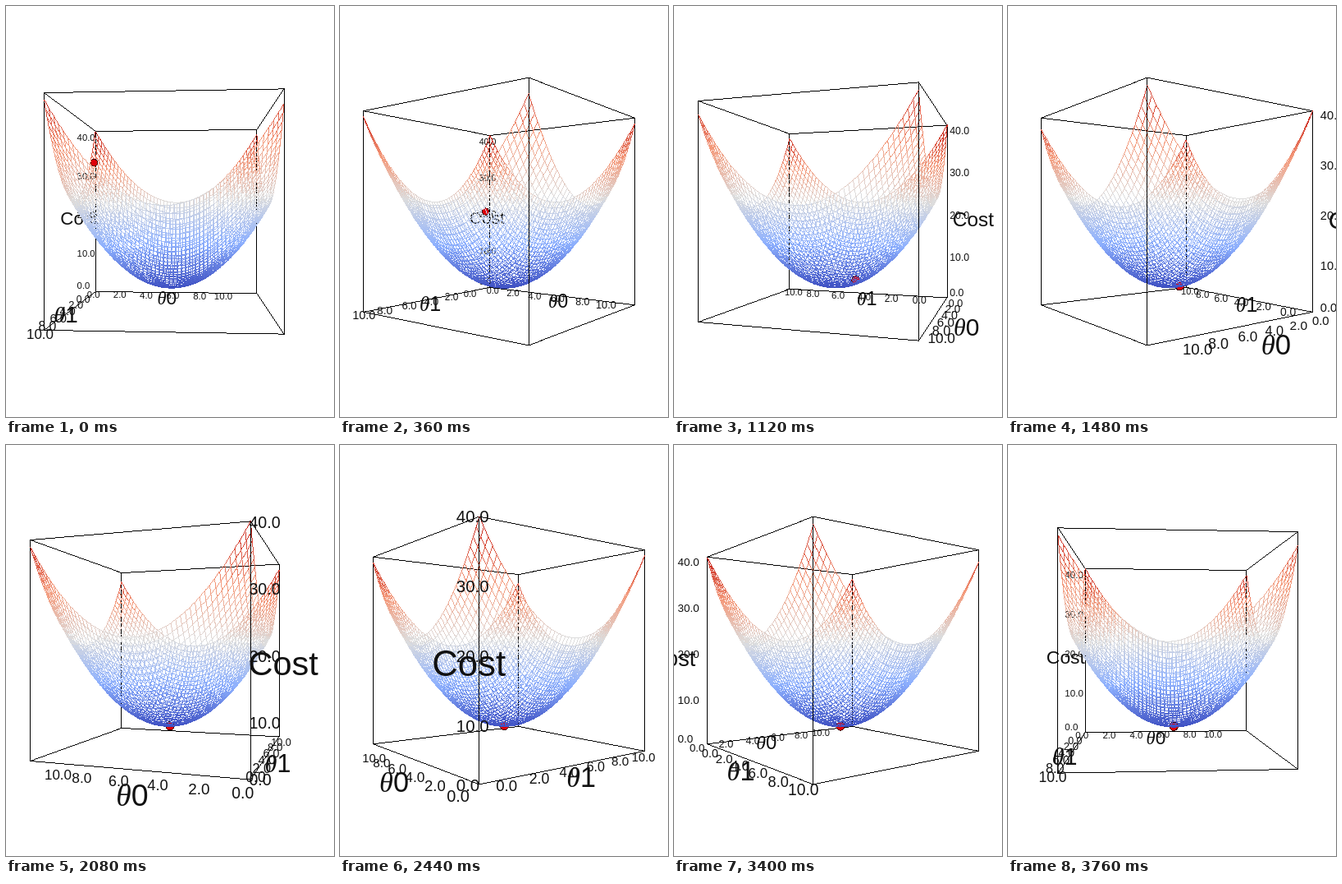
Animation, 400 px wide and 500 px high, one loop 3800 ms. Source, as an HTML page with a canvas:

```html
<!DOCTYPE html>
<html lang="en">
<head>
<meta charset="utf-8">
<title>Gradient descent on a cost surface</title>
<style>
  html, body { margin: 0; width: 100%; height: 100%; overflow: hidden; background: #fff; }
  canvas { display: block; width: 400px; height: 500px; }
</style>
</head>
<body>
<canvas id="stage" width="400" height="500"></canvas>
<script>
const W = 400, H = 500, STEP = 40, FRAMES = 95;
const FOCAL = 599, DIST = 2.54;
const ctx = document.getElementById('stage').getContext('2d', { willReadFrequently: true });
const depth = new Float32Array(W * H);
const SANS = '"Liberation Sans", Arial, sans-serif';
const SERIF = '"Liberation Serif", "Times New Roman", serif';

// Cost bowl inside a unit cube centred on the origin
const LOW = -0.39, CURVE = 1.72, MID = 0.0087, GRID = 50;
const cost = (u, v) => LOW + CURVE * ((u - MID) ** 2 + (v - MID) ** 2);

const STOPS = [[59, 76, 192], [141, 176, 254], [221, 221, 221], [244, 154, 123], [200, 36, 26]];
function heat(h) {
  const k = Math.min(3.999, Math.max(0, (h - LOW) / (0.5 - LOW) * 4));
  const i = Math.floor(k), f = k - i;
  return STOPS[i].map((c, j) => c + (STOPS[i + 1][j] - c) * f);
}

const mesh = [];
for (let i = 0; i < GRID; i++) {
  for (let j = 0; j < GRID; j++) {
    const u = i / (GRID - 1) - 0.5, v = j / (GRID - 1) - 0.5, h = cost(u, v);
    mesh.push({ u, v, h, rgb: heat(h) });
  }
}

// Labels: position, text and size in world units
const labels = [];
const tick = (u, v, h, n) => labels.push({ u, v, h, text: n.toFixed(1), size: 0.0595 });
for (let i = 0; i < 6; i++) {
  tick(i < 5 ? -0.505 + 0.1695 * i : 0.305, -0.57, -0.53, 2 * i);
  tick(-0.52, i < 5 ? -0.358 + 0.17 * i : 0.474, -0.523, 2 * i);
}
for (let i = 0; i < 5; i++) tick(-0.57, -0.57, i ? -0.515 + 0.2474 * i : -0.475, 10 * i);
const title = (u, v, h, text) => labels.push({ u, v, h, text, size: 0.12, title: true });
title(-0.062, -0.64, -0.56, 'θ0');
title(-0.548, -0.004, -0.54, 'θ1');
title(-0.638, -0.638, -0.043, 'Cost');

let cos = 1, sin = 0, pixels;

function project(u, v, h) {
  const z = DIST - (v * cos + u * sin), s = FOCAL / z;
  return { x: W / 2 + (u * cos - v * sin) * s, y: H / 2 - h * s, z, s };
}

function plot(x, y, z, rgb) {
  if (x < 0 || y < 0 || x >= W || y >= H) return;
  const i = Math.floor(y) * W + Math.floor(x);
  if (z >= depth[i]) return;
  depth[i] = z;
  pixels[4 * i] = rgb[0];
  pixels[4 * i + 1] = rgb[1];
  pixels[4 * i + 2] = rgb[2];
  pixels[4 * i + 3] = 255;
}

function line(a, b, rgb) {
  const dx = b.x - a.x, dy = b.y - a.y, dz = b.z - a.z;
  const n = Math.max(1, Math.ceil(Math.max(Math.abs(dx), Math.abs(dy))));
  for (let i = 0; i <= n; i++) {
    const t = i / n;
    plot(a.x + dx * t, a.y + dy * t, a.z + dz * t, rgb);
  }
}

function drawMesh() {
  const pts = mesh.map(p => project(p.u, p.v, p.h));
  for (let i = 0; i < GRID; i++) {
    for (let j = 0; j < GRID; j++) {
      const k = i * GRID + j;
      if (i < GRID - 1) line(pts[k], pts[k + GRID], mesh[k].rgb);
      if (j < GRID - 1) line(pts[k], pts[k + 1], mesh[k].rgb);
    }
  }
}

function drawBox() {
  const black = [0, 0, 0], e = [-0.5, 0.5];
  const edge = (a, b) => line(project(...a), project(...b), black);
  for (const p of e) {
    for (const q of e) {
      edge([-0.5, p, q], [0.5, p, q]);
      edge([p, -0.5, q], [p, 0.5, q]);
      edge([p, q, -0.5], [p, q, 0.5]);
    }
  }
}

function drawBall(n) {
  const s = Math.exp(-0.89 * (n / 19) ** 1.545);
  const u = MID - 0.4917 * s, v = MID - 0.3937 * s;
  const c = project(u, v, cost(u, v)), r = 14 / c.z;
  for (let y = Math.floor(c.y - r); y <= c.y + r; y++) {
    for (let x = Math.floor(c.x - r); x <= c.x + r; x++) {
      const d = Math.hypot(x + 0.5 - c.x, y + 0.5 - c.y);
      if (d > r) continue;
      const z = c.z - Math.sqrt(r * r - d * d) / c.s;
      plot(x, y, z, d > r - 0.9 ? [70, 0, 0] : [222, 0, 10]);
    }
  }
}

function drawLabel(l, p) {
  const px = l.size * p.s, y = p.y + 0.358 * px;
  const sans = px + 'px ' + SANS;
  ctx.font = sans;
  if (!l.title) {
    ctx.fillText(l.text, p.x - 0.064 * p.s, y);
  } else if (l.text[0] !== 'θ') {
    ctx.fillText(l.text, p.x - ctx.measureText(l.text).width / 2, y);
  } else {
    const digit = l.text[1], dw = ctx.measureText(digit).width;
    ctx.font = 'italic ' + px + 'px ' + SERIF;
    const tw = ctx.measureText('θ').width, x = p.x - (tw + dw) / 2;
    ctx.fillText('θ', x, y);
    ctx.font = sans;
    ctx.fillText(digit, x + tw, y);
  }
}

function draw(n) {
  const a = (n + 1) * Math.PI / 48;
  cos = Math.cos(a);
  sin = Math.sin(a);
  const placed = labels.map(l => [l, project(l.u, l.v, l.h)]);

  ctx.fillStyle = '#fff';
  ctx.fillRect(0, 0, W, H);
  ctx.fillStyle = '#111';
  for (const [l, p] of placed) if (p.z > DIST) drawLabel(l, p);

  const image = ctx.getImageData(0, 0, W, H);
  pixels = image.data;
  depth.fill(Infinity);
  drawBox();
  drawMesh();
  drawBall(n);
  ctx.putImageData(image, 0, 0);

  for (const [l, p] of placed) if (p.z <= DIST) drawLabel(l, p);
}

const start = performance.now();
let shown = -1;
function loop() {
  const n = Math.floor((performance.now() - start) / STEP) % FRAMES;
  if (n !== shown) draw(shown = n);
  requestAnimationFrame(loop);
}
loop();
</script>
</body>
</html>
```
